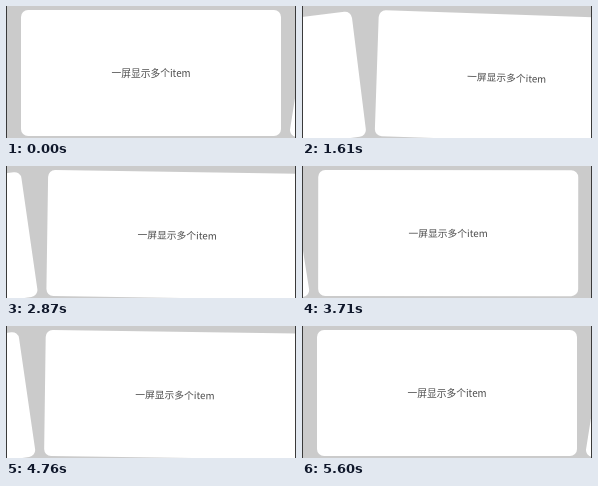
An HTML page that plays this animation: 290 by 132 pixels, repeating every 5670 ms.

```html
<!DOCTYPE html>
<html lang="zh">
<head>
<meta charset="utf-8">
<title>Pager</title>
<style>
html, body { margin: 0; width: 100%; height: 100%; overflow: hidden; }
#stage {
  --p: 0;
  position: relative;
  width: 290px;
  height: 132px;
  overflow: hidden;
  background: #cbcbcb;
}
#stage::after {
  content: "";
  position: absolute;
  inset: 0;
  border: solid #3a3a3a;
  border-width: 0 1px;
}
.card {
  --d: calc(var(--i) - var(--p));
  position: absolute;
  left: 15px;
  top: 4px;
  width: 260px;
  height: 126px;
  border-radius: 7px;
  background: #fff;
  color: #4c4c4c;
  font: 9.75px/126px "Noto Sans CJK SC", "Noto Sans CJK", sans-serif;
  text-align: center;
  white-space: nowrap;
  /* pivot on the bottom corner nearest the centre page */
  transform-origin: clamp(0px, var(--d) * -1e6px, 260px) 100%;
  transform: translateX(calc(var(--d) * 268px)) rotate(calc(clamp(-1, var(--d), 1) * 9deg));
}
</style>
</head>
<body>
<div id="stage">
  <div class="card" style="--i:0">一屏显示多个item</div>
  <div class="card" style="--i:1">一屏显示多个item</div>
  <div class="card" style="--i:2">一屏显示多个item</div>
</div>
<script>
const LOOP = 5670, STEP = 70, SETTLE = 600;
const stage = document.getElementById('stage');

// Each swipe: drag from start to release, then settle on the next page.
const swipes = [
  { start: 910, release: 1540, drag: 0.6, dir: 1 },
  { start: 2240, release: 2700, drag: 0.5, dir: 1 },
  { start: 3700, release: 4090, drag: 0.5, dir: -1 },
  { start: 4550, release: 5070, drag: 0.28, dir: -1 }
];

function travel(s, t) {
  if (t <= s.start) return 0;
  if (t < s.release) return s.drag * ((t - s.start) / (s.release - s.start)) ** 1.3;
  const u = Math.min(1, (t - s.release) / SETTLE);
  return 1 - (1 - s.drag) * (1 - u) ** 5;
}

function draw(now) {
  const t = Math.floor((now % LOOP) / STEP) * STEP;
  const page = swipes.reduce((sum, s) => sum + s.dir * travel(s, t), 0);
  stage.style.setProperty('--p', page.toFixed(4));
  requestAnimationFrame(draw);
}
requestAnimationFrame(draw);
</script>
</body>
</html>
```
